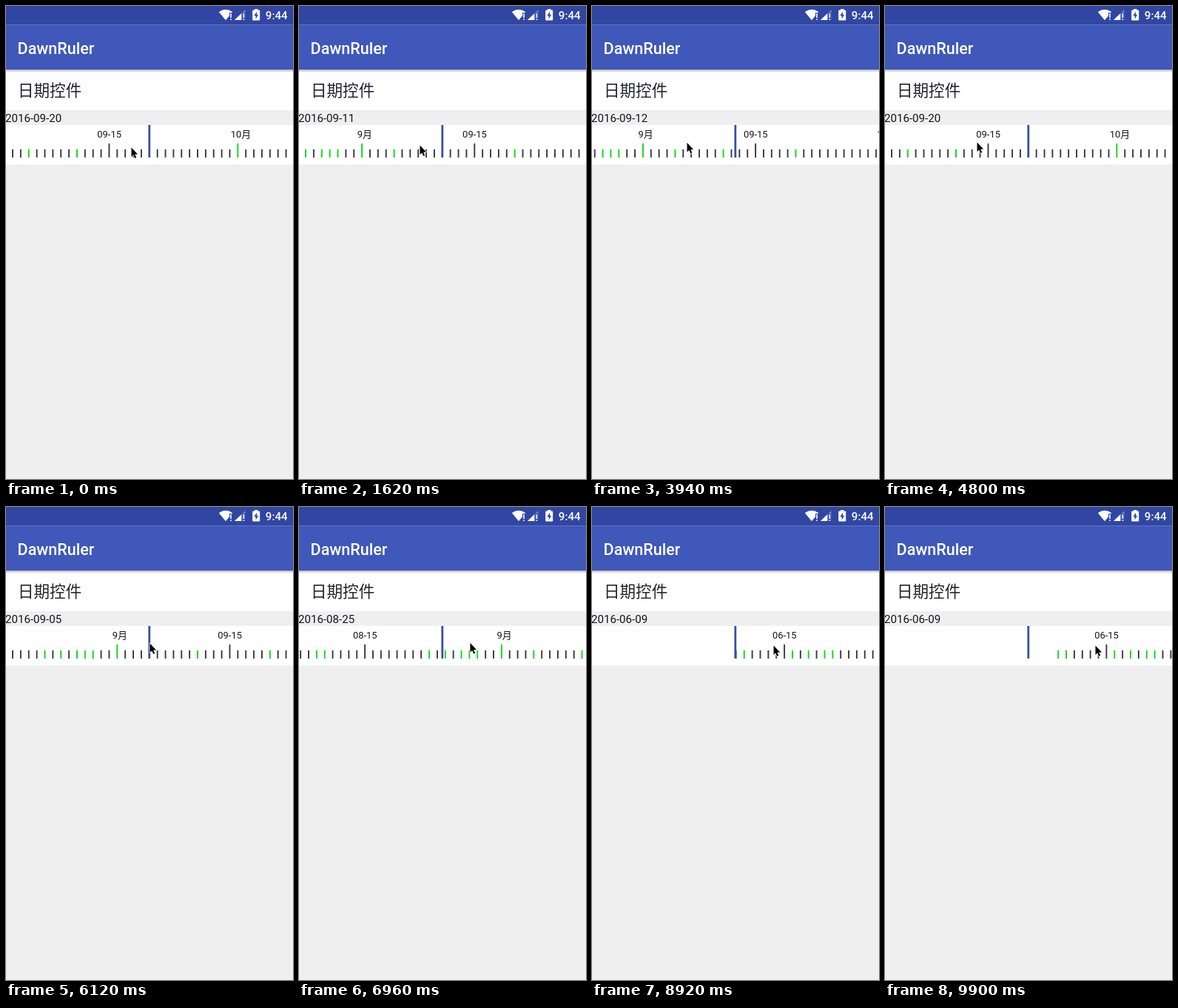
An HTML page with a canvas for the animation above (10000 ms loop, 388 by 640 pixels).

```html
<!DOCTYPE html>
<html lang="zh-CN">
<head>
<meta charset="utf-8">
<title>日期控件</title>
<style>
html, body { margin: 0; width: 100%; height: 100%; overflow: hidden; background: #efefef; }
canvas { display: block; width: 388px; height: 640px; }
</style>
</head>
<body>
<canvas id="stage" width="388" height="640"></canvas>
<script>
const ctx = document.getElementById('stage').getContext('2d');
const LOOP = 10000, FRAME = 20;
const STEP = 10.87, MID = 193.8;
const STATUS = '#3046a2', BAR = '#3f58b9', INK = '#16161c';
const LATIN = 'Roboto, "Noto Sans CJK SC", "Noto Sans CJK JP", "Noto Sans CJK", sans-serif';
const CJK = '"Noto Sans CJK SC", "Noto Sans CJK JP", "Noto Sans CJK", sans-serif';

// Days are counted from the first day on the ruler.
const FIRST = Date.UTC(2016, 5, 9), DAY = 864e5, LAST = 144;
const marked = new Set([0, 1, 7, 9, 11, 12, 18, 23, 30, 36, 42, 49, 57, 58, 61, 62,
  75, 77, 79, 80, 81, 84, 88, 94, 103, 114]);

const ease = {
  hold: () => 0,
  both: u => u * u * (3 - 2 * u),
  in: u => u * u,
  out: u => 1 - (1 - u) ** 3,
  line: u => u
};

// [time, value..., easing towards the next key]
const scroll = [
  [0, 103, 'hold'], [560, 103, 'both'], [1560, 94, 'hold'],
  [2220, 94, 'both'], [3140, 89, 'hold'],
  [3600, 89, 'in'], [3940, 95.49, 'out'], [4600, 103, 'hold'],
  [4800, 103, 'both'], [6100, 88, 'hold'], [6140, 88, 'both'], [7840, 64, 'hold'],
  [7900, 64, 'in'], [7960, 63.15, 'both'], [8540, 0, 'hold'],
  [8820, 0, 'both'], [9840, -3.715, 'hold'], [LOOP, -3.715, 'hold']
];
const pointer = [
  [0, 169, 191, 'hold'], [60, 169, 191, 'both'], [360, 53, 189, 'hold'],
  [560, 53, 189, 'both'], [1560, 163, 188, 'hold'],
  [2220, 163, 188, 'both'], [3140, 198, 185, 'hold'],
  [3600, 198, 185, 'both'], [3940, 128, 184.5, 'out'], [4660, 124, 184, 'hold'],
  [4800, 124, 184, 'both'], [6100, 194, 184, 'hold'], [6140, 194, 184, 'both'],
  [7840, 272, 183, 'hold'], [7900, 272, 183, 'line'], [7960, 281, 182, 'out'],
  [8120, 298, 183, 'both'], [8540, 244, 187, 'hold'],
  [8820, 244, 187, 'both'], [9840, 284, 187, 'hold'], [LOOP, 284, 187, 'hold']
];

function sample(keys, t) {
  let i = 0;
  while (i < keys.length - 2 && t >= keys[i + 1][0]) i++;
  const a = keys[i], b = keys[i + 1];
  const k = ease[a[a.length - 1]]((t - a[0]) / (b[0] - a[0]));
  return a.slice(1, -1).map((v, n) => v + (b[n + 1] - v) * k);
}

function rect(color, x, y, w, h) {
  ctx.fillStyle = color;
  ctx.fillRect(x, y, w, h);
}

function text(str, x, y, size, color, family = LATIN, weight = 400) {
  ctx.font = `${weight} ${size}px ${family}`;
  ctx.fillStyle = color;
  ctx.fillText(str, x, y);
}

function poly(color, points) {
  ctx.beginPath();
  points.forEach(([x, y]) => ctx.lineTo(x, y));
  ctx.closePath();
  ctx.fillStyle = color;
  ctx.fill();
}

function alertMark(x, y) {
  rect(STATUS, x - 1.2, y - 1, 4, 11);
  rect('#fff', x, y, 1.6, 6);
  rect('#fff', x, y + 7.4, 1.6, 1.6);
}

function statusIcons() {
  ctx.beginPath();
  ctx.moveTo(297, 19.3);
  ctx.lineTo(287.8, 8);
  ctx.quadraticCurveTo(297, 1.4, 306.2, 8);
  ctx.closePath();
  ctx.fillStyle = '#fff';
  ctx.fill();
  alertMark(303.2, 10);

  poly('rgba(255,255,255,.35)', [[309, 19], [323.5, 5], [323.5, 19]]);
  poly('#fff', [[309, 19], [318, 10.3], [318, 19]]);
  alertMark(320.6, 10);

  rect('#fff', 336, 4, 4.4, 3);
  ctx.beginPath();
  ctx.roundRect(333.2, 5.6, 10, 13.8, 1.2);
  ctx.fill();
  poly(STATUS, [[339, 7.6], [335.4, 13.3], [337.6, 13.3], [337.6, 17.4], [341.2, 11.7], [339, 11.7]]);

  text('9:44', 350.8, 18, 15.1, '#fff', LATIN, 500);
}

function chrome() {
  rect('#efefef', 0, 0, 388, 640);
  rect('#fff', 0, 86, 388, 55);
  rect('#fff', 0, 161, 388, 53.5);
  rect(STATUS, 0, 0, 388, 25.5);
  rect(BAR, 0, 25.5, 388, 60.5);
  const shade = ctx.createLinearGradient(0, 86, 0, 90);
  shade.addColorStop(0, 'rgba(0,0,0,.28)');
  shade.addColorStop(1, 'rgba(0,0,0,0)');
  rect(shade, 0, 86, 388, 4);
  statusIcons();
  text('DawnRuler', 15.6, 64.5, 21.56, '#fff', LATIN, 500);
  text('日期控件', 16, 122, 21.56, '#23232d', CJK);
}

function ruler(pos) {
  const from = Math.max(0, Math.floor(pos - 21)), to = Math.min(LAST, Math.ceil(pos + 20));
  for (let d = from; d <= to; d++) {
    const x = MID + (d - pos) * STEP;
    const date = new Date(FIRST + d * DAY);
    const num = date.getUTCDate(), month = date.getUTCMonth() + 1;
    const label = num === 1 ? month + '月' : num === 15 ? String(month).padStart(2, '0') + '-15' : '';
    const top = label ? 186 : 194;
    rect(marked.has(d) ? '#10d818' : '#3a3a42', x - 0.95, top, 1.9, 205 - top);
    if (label) text(label, x - label.length * 12.93 / 4, 177.7, 12.93, INK);
  }
  rect('#3a4ea6', 192.4, 161, 2.8, 44);
  const day = Math.max(0, Math.round(pos));
  text(new Date(FIRST + day * DAY).toISOString().slice(0, 10), -1, 157, 15.1, INK);
}

function arrow(x, y) {
  ctx.save();
  ctx.translate(x, y);
  ctx.lineJoin = 'round';
  ctx.lineWidth = 1.4;
  ctx.strokeStyle = '#fff';
  poly('#000', [[0.5, 0.5], [0.5, 13], [3.2, 10.4], [5.2, 15], [7.2, 14.1], [5.2, 9.7], [9, 9.5]]);
  ctx.stroke();
  ctx.fill();
  ctx.restore();
}

function draw(now) {
  const t = Math.floor((now % LOOP) / FRAME) * FRAME;
  chrome();
  ruler(sample(scroll, t)[0]);
  arrow(...sample(pointer, t));
}

const start = performance.now();
function tick() {
  draw(performance.now() - start);
  requestAnimationFrame(tick);
}
tick();
</script>
</body>
</html>
```
